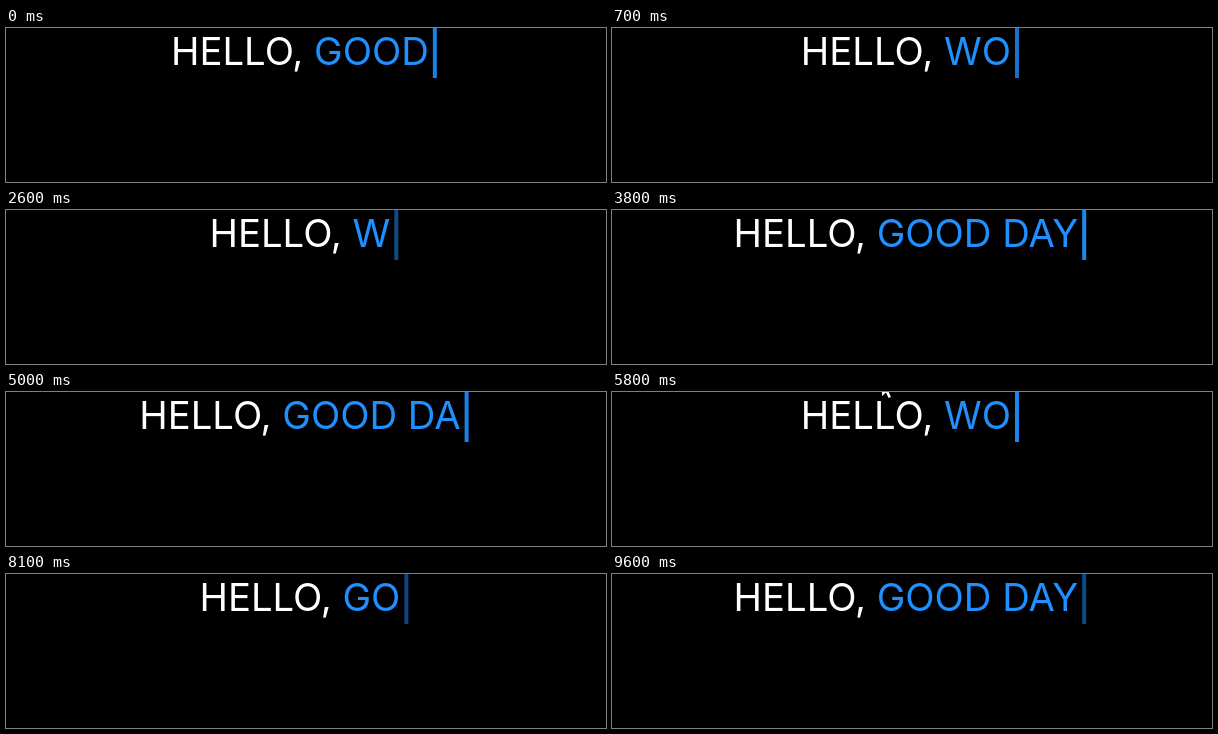
Write an HTML page with a canvas that moves like this. It is 600 px wide and 154 px high and loops after 9.7 s.

```html
<!DOCTYPE html>
<html lang="en">
<head>
<meta charset="utf-8">
<title>Hello typing</title>
<style>
  html, body { margin: 0; width: 100%; height: 100%; overflow: hidden; background: #000; }
  canvas { display: block; width: 600px; height: 154px; }
</style>
</head>
<body>
<canvas id="stage" width="600" height="154"></canvas>
<script>
const ctx = document.getElementById('stage').getContext('2d');
const LOOP = 9700, BLUE = '#1e90ff', HEAD = 'HELLO, ';
const CENTER = 297.9, BASE = 37, GAP = 4, CARET = 4;
const TYPE_MS = 100, ERASE_MS = 50;

// Each run types (+1) or erases (-1) a word, starting at the given time.
const runs = [
  [-170, 'GOOD DAY', -1],
  [540, 'WORLD!', 1],
  [2370, 'WORLD!', -1],
  [2950, 'GOOD DAY', 1],
  [4970, 'GOOD DAY', -1],
  [5650, 'WORLD!', 1],
  [7370, 'WORLD!', -1],
  [7950, 'GOOD DAY', 1]
];

function wordAt(t) {
  const [start, word, dir] = runs.filter(r => r[0] <= t).pop();
  const steps = Math.floor((t - start) / (dir > 0 ? TYPE_MS : ERASE_MS)) + 1;
  return word.slice(0, Math.max(0, dir > 0 ? steps : word.length - steps));
}

// cubic-bezier(.25, .1, .25, 1)
function ease(x) {
  const curve = (s, a, b) => 3 * a * s * (1 - s) ** 2 + 3 * b * s * s * (1 - s) + s ** 3;
  let lo = 0, hi = 1;
  for (let i = 0; i < 20; i++) {
    const mid = (lo + hi) / 2;
    if (curve(mid, 0.25, 0.25) < x) lo = mid; else hi = mid;
  }
  return curve(lo, 0.1, 1);
}

function caretAlpha(t) {
  const p = ((t + 550) % 1000) / 500;
  return p < 1 ? ease(p) : 1 - ease(p - 1);
}

function drawPointer(x, y) {
  const shape = [[0, 0], [0, 16], [4, 12.5], [6.5, 18], [9, 17], [6.5, 11.5], [11, 11.5]];
  ctx.beginPath();
  shape.forEach(([dx, dy]) => ctx.lineTo(x + dx, y + dy));
  ctx.closePath();
  ctx.fillStyle = '#fff';
  ctx.fill();
}

function draw(t) {
  ctx.fillStyle = '#000';
  ctx.fillRect(0, 0, 600, 154);
  ctx.font = '400 38.3px Inter, sans-serif';

  const word = wordAt(t);
  const headWidth = ctx.measureText(HEAD).width;
  const textWidth = headWidth + ctx.measureText(word).width;
  const left = CENTER - (textWidth + GAP + CARET) / 2;

  ctx.fillStyle = '#fff';
  ctx.fillText(HEAD, left, BASE);
  ctx.fillStyle = BLUE;
  ctx.fillText(word, left + headWidth, BASE);

  ctx.globalAlpha = caretAlpha(t);
  ctx.fillRect(left + textWidth + GAP, 0, CARET, 50);
  ctx.globalAlpha = 1;

  if (t >= 5750 && t < 5900) drawPointer(270, -12);
}

const begin = performance.now();
function tick() {
  draw((performance.now() - begin) % LOOP);
  requestAnimationFrame(tick);
}
tick();
</script>
</body>
</html>
```
